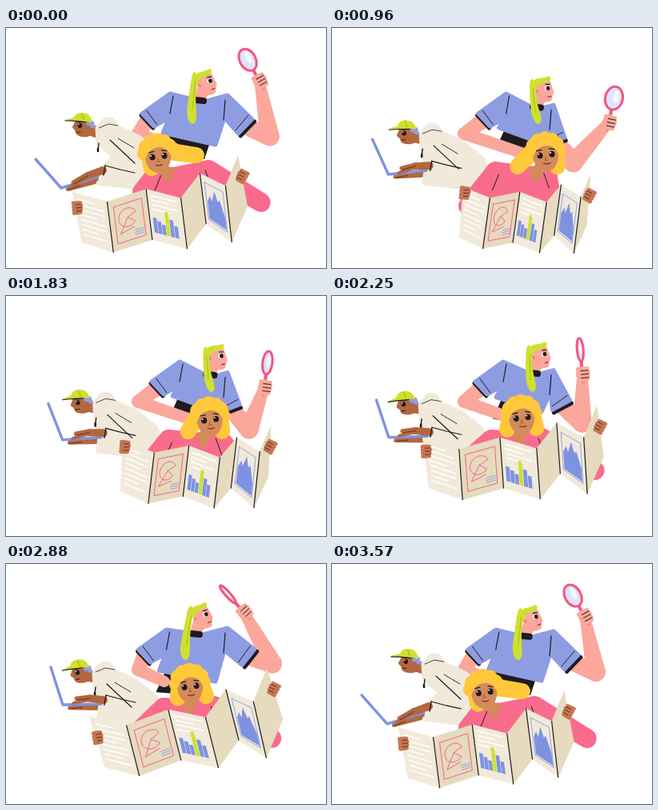
Write an HTML page with a canvas that moves like this. It is 400 by 300 pixels and loops after 3.6 s.

```html
<!DOCTYPE html>
<html lang="en">
<head>
<meta charset="utf-8">
<title>Team reading a map</title>
<style>
html, body { margin: 0; width: 100%; height: 100%; overflow: hidden; background: #fff; }
canvas { display: block; width: 400px; height: 300px; }
</style>
</head>
<body>
<canvas id="stage" width="400" height="300"></canvas>
<script>
const LOOP = 3600, STEP = 30, TAU = Math.PI * 2;
const ctx = document.getElementById('stage').getContext('2d');
const INK = '#1f1b1e', BLUE = '#8e9de2', LIME = '#cfe02f', ROSE = '#fba79b', PINK = '#f96b8d',
  RING = '#f5557f', CREAM = '#f1e9da', SAND = '#e6dabf', BROWN = '#b3673f', UMBER = '#5f2f1e',
  TAN = '#d48a5a', PALM = '#c57650', GOLD = '#ffc83a', BASE = '#7d93e2';

// A few drivers move everything; the other joints follow from them.
const TIMES = [0, 450, 960, 1380, 2250, 2880];
const drivers = {
  lift: [0, .5, .71, .71, .97, 1],
  mapLeft: [83, 109, 164, 178, 113, 104],
  mapLeftY: [205, 211, 199, 188, 177, 191],
  mapRight: [290, 302, 323, 331, 331, 326],
  mapRightY: [160, 170, 184, 186, 138, 131],
  readX: [190, 205, 267, 270, 237, 230],
  seekX: [250, 256, 264, 265, 260, 245],
  fistX: [317, 327, 346, 334, 313, 298],
  fistY: [67, 82, 118, 123, 98, 61],
  lensTurn: [-.5, -.33, .21, .24, -.09, -.73],
  lensWidth: [10, 10, 11, 9, 4, 3]
};

// Periodic monotone cubic: smooth, with rests at the extremes.
function sample(values, t) {
  const n = TIMES.length, v = k => values[(k + n) % n];
  const time = k => TIMES[(k + n) % n] + Math.floor(k / n) * LOOP;
  const slope = k => (v(k + 1) - v(k)) / (time(k + 1) - time(k));
  const tangent = k => {
    const a = slope(k - 1), b = slope(k);
    return a * b <= 0 ? 0 : 2 * a * b / (a + b);
  };
  const i = TIMES.findLastIndex(key => key <= t);
  const h = time(i + 1) - time(i), s = (t - time(i)) / h, r = 1 - s;
  return v(i) * (1 + 2 * s) * r * r + v(i + 1) * s * s * (3 - 2 * s)
    + h * s * r * (tangent(i) * r - tangent(i + 1) * s);
}

const add = (p, x, y) => [p[0] + x, p[1] + y];
const mix = (a, b, k) => [a[0] + (b[0] - a[0]) * k, a[1] + (b[1] - a[1]) * k];
const angle = (a, b) => Math.atan2(b[1] - a[1], b[0] - a[0]);
const range = n => [...Array(n).keys()];

function trace(points) {
  ctx.beginPath();
  points.forEach(p => ctx.lineTo(...p));
}
function line(points, color = INK, width = 1.2) {
  trace(points);
  ctx.strokeStyle = color;
  ctx.lineWidth = width;
  ctx.stroke();
}
function poly(points, color, round = 0) {
  trace(points);
  ctx.closePath();
  ctx.fillStyle = ctx.strokeStyle = color;
  ctx.fill();
  if (round) { ctx.lineWidth = round; ctx.stroke(); }
}
function blob(points, color) {
  const n = points.length;
  ctx.beginPath();
  ctx.moveTo(...mix(points[n - 1], points[0], .5));
  points.forEach((p, i) => ctx.quadraticCurveTo(...p, ...mix(p, points[(i + 1) % n], .5)));
  ctx.fillStyle = color;
  ctx.fill();
}
function oval(x, y, rx, ry, color) {
  ctx.beginPath();
  ctx.ellipse(x, y, rx, ry, 0, 0, TAU);
  ctx.fillStyle = color;
  ctx.fill();
}
function limb(a, b, ra, rb, color) {
  const dist = Math.max(Math.hypot(b[0] - a[0], b[1] - a[1]), Math.abs(ra - rb) + .01);
  const dir = angle(a, b), open = Math.acos((ra - rb) / dist);
  ctx.beginPath();
  ctx.arc(...a, ra, dir + open, dir - open + TAU);
  ctx.arc(...b, rb, dir - open, dir + open);
  ctx.fillStyle = color;
  ctx.fill();
}
function at([x, y], rot, draw, scale = 1) {
  ctx.save();
  ctx.translate(x, y);
  ctx.rotate(rot);
  ctx.scale(scale, scale);
  draw();
  ctx.restore();
}
function eye(x, y, r) {
  oval(x, y, r, r * 1.1, INK);
  oval(x - r * .5, y - r * .5, r * .28, r * .28, '#fff');
}
function fingers(side, gap, reach, skin, crease) {
  for (const k of range(4)) {
    const y = (k - 1.5) * gap;
    limb([-side * 5, y], [side * (reach - Math.abs(k - 1.2)), y], gap * .6, gap * .52, skin);
    if (k) line([[-side * 2, y - gap / 2], [side * reach, y - gap / 2]], crease, .9);
  }
}

function drawSeeker({ seekX, fistX, fistY, lensTurn, lensWidth }) {
  const sway = seekX - 250, head = [seekX, 70 + sway * .6];
  const neck = add(head, -8, 19), fist = [fistX, fistY];
  const lens = add(fist, 31 * Math.sin(lensTurn), -31 * Math.cos(lensTurn));
  const elbow = [333 - .55 * (fistY - 61), 118 + 6.6 * Math.sqrt(fistY - 60)];
  const shoulderL = [205 + sway * .9, 82], shoulderR = [277, 82 + (elbow[1] - 130) * .37];
  const dir = angle(shoulderR, elbow), ahead = [Math.cos(dir), Math.sin(dir)];
  const along = (p, k) => add(p, ahead[0] * k, ahead[1] * k);
  const cuffR = along(shoulderR, 43), cuffRIn = add(cuffR, -ahead[1] * 25, ahead[0] * 25);
  const cuffL = add(shoulderL, -35, 25), cuffLIn = add(cuffL, 15, 16);
  const pitL = add(shoulderL, -1, 30), pitR = add(shoulderR, -4, 28);
  const hipL = add(shoulderL, -9, 49 - sway * .45), hipR = add(shoulderR, -15, 62 - sway);
  const elbowL = [165, 132];

  poly([add(hipL, 8, 0), add(hipR, -8, 0), add(hipR, -14, 18), add(hipL, -4, 27)], INK);
  limb(mix(cuffL, cuffLIn, .5), elbowL, 10, 8, ROSE);
  limb(elbowL, [210 + sway * 2.4, 150 + sway * .6], 8, 7, ROSE);
  limb(mix(cuffR, cuffRIn, .5), elbow, 10, 12, ROSE);
  limb(elbow, fist, 12, 6.5, ROSE);
  line([along(cuffR, 4), along(cuffRIn, 4)], INK, 5);
  line([add(cuffL, -1, 2), add(cuffLIn, -1, 2)], INK, 5);

  at(lens, lensTurn, () => {
    line([[0, 15], [0, 40]], RING, 4);
    oval(0, 0, lensWidth, 14.5, '#dbe4fa');
    oval(lensWidth * .2, -2, lensWidth * .35, 8, '#f6f8ff');
    ctx.beginPath();
    ctx.ellipse(0, 0, lensWidth, 14.5, 0, 0, TAU);
    ctx.strokeStyle = RING;
    ctx.lineWidth = 3;
    ctx.stroke();
  });
  at(fist, lensTurn, () => {
    oval(0, 0, 8, 10, ROSE);
    fingers(1, 4.5, 8, ROSE, INK);
  });

  limb(add(head, -3, 6), neck, 8, 7, ROSE);
  poly([shoulderL, add(neck, -9, 0), add(neck, 9, 2), shoulderR, cuffR, cuffRIn, pitR,
    hipR, hipL, pitL, cuffLIn, cuffL], BLUE, 5);
  line([add(neck, -5, 1), add(neck, 5, 2)], INK, 8);
  line([add(shoulderL, 4, 3), add(shoulderL, 0, 25)]);
  line([add(shoulderR, -3, 6), add(shoulderR, -5, 31)]);
  line([mix(cuffR, shoulderR, .16), mix(cuffRIn, pitR, .2)], INK, 1);
  line([mix(cuffL, shoulderL, .16), mix(cuffLIn, pitL, .2)], INK, 1);

  at(head, (head[1] - 79) * .018, () => {
    blob([[-9, -13], [9, -14], [11, -4], [14, 3], [11, 6], [11, 13], [2, 15], [-9, 12], [-12, 0]], ROSE);
    oval(-8, 1, 3.5, 4.5, ROSE);
    line([[-9, -1], [-7, 2]], '#c9655f', 1);
    oval(5, -3, 3, 2.8, '#fff');
    oval(6, -3, 2.4, 2.6, INK);
    line([[3, -8], [8, -8]], INK, 1.2);
    line([[6, 8], [10, 7]], '#8e3038', 1.2);
    blob([[-12, -2], [-14, -11], [-8, -16], [2, -16], [9, -19], [10, -12], [1, -10], [-6, -8], [-9, -2]], LIME);
  });
  const root = add(head, -15, -13), tip = [232 + sway * 1.75, 122];
  blob([add(root, -2, -3), add(root, 5, 0), add(mix(root, tip, .5), 3, 0), add(tip, 7, -6),
    tip, add(tip, -7, -12), add(mix(root, tip, .4), -5, 0)], LIME);
  line([add(root, 2, 10), mix(root, tip, .7)], '#a9bd20', 1);
}

function drawGuy({ lift }) {
  const rise = (x0, y0, x1, y1) => mix([x0, y0], [x1, y1], lift);
  const head = rise(96, 122, 93, 135), hood = rise(126, 116, 122, 126);
  const screen = rise(37, 164, 56, 129), hinge = rise(69, 200, 71, 176), end = rise(115, 186, 119, 175);
  const wrist = rise(121, 178, 122, 170), hand = rise(84, 193, 88, 168);
  const belly = 142 - 60 * lift + 36 * lift * lift;

  limb(add(mix(hinge, end, .18), 0, 4), add(mix(hinge, end, .95), 0, 4), 2.5, 4, BROWN);
  line([add(mix(hinge, end, .2), 0, 5), add(mix(hinge, end, .5), 0, 4)], UMBER, 1);
  limb(add(head, 5, 4), add(hood, -7, 16), 7, 7, BROWN);
  poly([add(hood, -12, 9), add(hood, -4, 1), add(hood, 14, 8), add(hood, 40, 20), add(hood, 65, 40),
    [198, 194], [166, 200], [115, 194], [belly, hood[1] + 50], add(hood, -11, 28)], CREAM, 5);
  limb(add(hood, 24, 45), add(wrist, 3, 1), 13, 8, CREAM);
  blob([add(hood, -10, 8), add(hood, -6, -4), add(hood, 8, -5), add(hood, 15, 6), add(hood, 2, 8), add(hood, -8, 20)], CREAM);
  line([add(hood, -10, 9), add(hood, 2, 4), add(hood, 14, 6)], INK, .8);
  line([add(hood, -10, 28), add(hood, -11, 37)], INK, 1.4);
  line([add(hood, -11, 35), add(hood, -11, 38)], INK, 2.6);
  line([add(hood, 4, 24), add(hood, 20, 39), add(hood, 35, 53)]);
  line([add(hood, 14, 22), add(hood, 34, 34)], INK, .9);
  line([add(wrist, 3, -6), add(wrist, 22, -1), add(wrist, 40, 3)]);

  at(head, .03 - .2 * lift * lift, () => {
    blob([[-10, -9], [12, -9], [15, 2], [12, 13], [3, 16], [-9, 13], [-10, 6], [-15, 3], [-11, -3]], BROWN);
    poly([[3, -6], [14, -6], [16, 3], [8, 2]], BLUE, 1);
    oval(8, 4, 3, 4, BROWN);
    eye(-4, 0, 3);
    line([[-7, -5], [-1, -5]], INK, 1.2);
    line([[-8, 9], [-3, 9]], INK, 1);
    blob([[-13, -5], [-11, -15], [-2, -18], [9, -15], [14, -3], [6, -6], [-4, -7]], LIME);
    poly([[-23, -7], [-12, -10], [2, -8], [4, -6], [-10, -6]], LIME, 1);
    line([[-24, -6], [-12, -6], [4, -5]], INK, 1.2);
    line([[-2, -16], [1, -8]], '#9cac1f', 1);
  }, .93);

  line([screen, hinge, end], BASE, 3.4);
  const knuckle = add(mix(wrist, hand, .5), 0, -1);
  limb(wrist, knuckle, 5, 4.5, BROWN);
  limb(knuckle, hand, 4.5, 2.5, BROWN);
  limb(knuckle, add(hand, -4, 6), 3.5, 1.8, BROWN);
  line([knuckle, add(hand, 1, 2)], UMBER, 1);
  line([add(wrist, 3, -6), add(wrist, 1, 6)], INK, 1.4);
}

function drawReader({ readX, mapLeft, mapRight, mapLeftY, mapRightY }, lean) {
  const turn = readX - 190, flow = Math.exp(-turn / 25);
  const face = [readX, 151 + ((mapLeftY + mapRightY) / 2 - 157) * .2 + flow * 4];
  const body = 221 + ((mapLeft + mapRight) / 2 - 186) * .25;
  const shoulderL = [body - 31, 179], shoulderR = [body + 32, 178];
  const elbowL = [170, 205 + Math.max(0, -lean) * 2];
  const elbowR = [270 + (mapRight - mapLeft - 153) * .9, 218];
  const chest = add(mix(face, [body, 179], .4), 0, 16);

  poly([add(shoulderL, 0, -10), add(chest, -8, -8), add(chest, 8, -8), add(shoulderR, 0, -11),
    add(shoulderR, 12, 0), add(shoulderR, 2, 42), add(shoulderL, 0, 42), mix(shoulderL, elbowL, .8)], PINK, 4);
  limb(shoulderL, elbowL, 12, 12, PINK);
  limb(shoulderR, elbowR, 13, 12, PINK);
  poly([add(chest, -7, -8), add(chest, 8, -8), add(chest, 1, 11)], TAN, 2);
  line([add(shoulderL, 4, 4), add(shoulderL, -4, 24)], INK, 1);
  line([add(shoulderR, -4, 0), add(shoulderR, 4, 22)], INK, 1);
  limb(add(face, 0, 8), chest, 8, 7, TAN);

  limb(add(face, -12, -8), add(face, -8 - turn * turn / 220, 15), 11, 10, GOLD);
  limb(add(face, 12, -6), add(face, 13 + 35 * flow, 16 - 17 * flow), 11, 10, GOLD);
  at(face, -.06, () => {
    for (const i of range(7)) {
      const a = Math.PI * (1 + i / 6);
      oval(17 * Math.cos(a), -4 + 16 * Math.sin(a), 9, 9, GOLD);
    }
    blob([[-15, -12], [15, -12], [17, 3], [11, 18], [1, 22], [-11, 18], [-17, 3]], TAN);
    eye(-7, 1, 3.5);
    eye(8, 0, 3.5);
    line([[-11, -5], [-5, -6]], INK, 1.3);
    line([[5, -7], [11, -6]], INK, 1.3);
    line([[0, 3], [-1, 7], [2, 7]], '#9a5433', 1);
    line([[-3, 11], [1, 12], [5, 11]], '#8e3038', 1.4);
    blob([[-17, 5], [-18, -14], [0, -22], [18, -14], [18, 5], [13, -7], [3, -12], [-8, -9], [-13, -4]], GOLD);
  });
}

function drawMap({ mapLeft, mapRight, mapLeftY, mapRightY }, lean) {
  const width = mapRight - mapLeft;
  const creases = [[0, 0], [.21, 21], [.445, 16], [.655, 36], [.77, 11], [.925, 33], [1, 0]];
  const tops = creases.map(([u, drop]) =>
    add(mix([mapLeft, mapLeftY], [mapRight, mapRightY], u), 0, drop * width / 200));
  const feet = tops.map((p, i) => add(p, lean + (i % 6 ? 0 : 4), i === 5 ? 70 : 63));
  const spot = (i, u, v) => mix(mix(tops[i], tops[i + 1], u), mix(feet[i], feet[i + 1], u), v);
  const shape = (i, ...uv) => uv.map(p => spot(i, ...p));
  const box = (i, l, t, r, b) => shape(i, [l, t], [r, t], [r, b], [l, b]);
  const rule = (i, l, r, v, color, size) => line(shape(i, [l, v], [r, v]), color, size);
  const frame = (i, color, size) => line([...box(i, .14, .14, .86, .87), spot(i, .14, .14)], color, size);

  for (const i of range(6)) poly(box(i, 0, 0, 1, 1), i % 2 ? SAND : CREAM, .6);
  for (let i = 1; i < 6; i++) line([tops[i], feet[i]], INK, 1.2);

  for (const k of range(8)) rule(0, .12, k % 3 ? .85 : .6, .12 + k * .1, '#fff', 1.5);
  for (const k of range(4)) rule(2, .12, k % 2 ? .6 : .85, .1 + k * .09, '#fff', 1.5);

  frame(1, RING, .9);
  const hub = spot(1, .46, .42);
  const pie = range(22).map(k => {
    const a = .7 + k / 21 * 5.2;
    return spot(1, .46 + .23 * Math.cos(a), .42 + .18 * Math.sin(a));
  });
  line([hub, ...pie, hub], RING, .9);
  line([hub, ...shape(1, [.24, .7], [.6, .64])], RING, .9);
  for (const k of range(3)) rule(1, .6, .82, .71 + k * .045, BASE, .8);

  [.3, .25, .2, .48, .34, .24].forEach((h, k) => {
    const l = .1 + k * .12;
    poly(box(2, l, .84 - h, l + .105, .84), k === 3 ? LIME : BASE);
  });

  frame(4, BASE, .8);
  poly(shape(4, [.18, .5], [.3, .36], [.36, .45], [.5, .22], [.6, .4], [.68, .34], [.84, .62], [.84, .84], [.18, .84]), BASE);

  at(add(mix(tops[0], feet[0], .22 + lean * .012), 3, 0), -lean / 90, () => fingers(1, 4.1, 5, PALM, UMBER));
  at(mix(tops[6], feet[6], .4), .5, () => fingers(-1, 4.1, 5, PALM, UMBER));
}

function render(now) {
  const t = Math.floor((now % LOOP) / STEP) * STEP, pose = {};
  for (const name in drivers) pose[name] = sample(drivers[name], t);
  const lean = -17 - .55 * (pose.mapRightY - pose.mapLeftY);
  ctx.fillStyle = '#fff';
  ctx.fillRect(0, 0, 400, 300);
  ctx.lineJoin = ctx.lineCap = 'round';
  drawSeeker(pose);
  drawGuy(pose);
  drawReader(pose, lean);
  drawMap(pose, lean);
}

const start = performance.now();
function tick() {
  render(performance.now() - start);
  requestAnimationFrame(tick);
}
tick();
</script>
</body>
</html>
```
